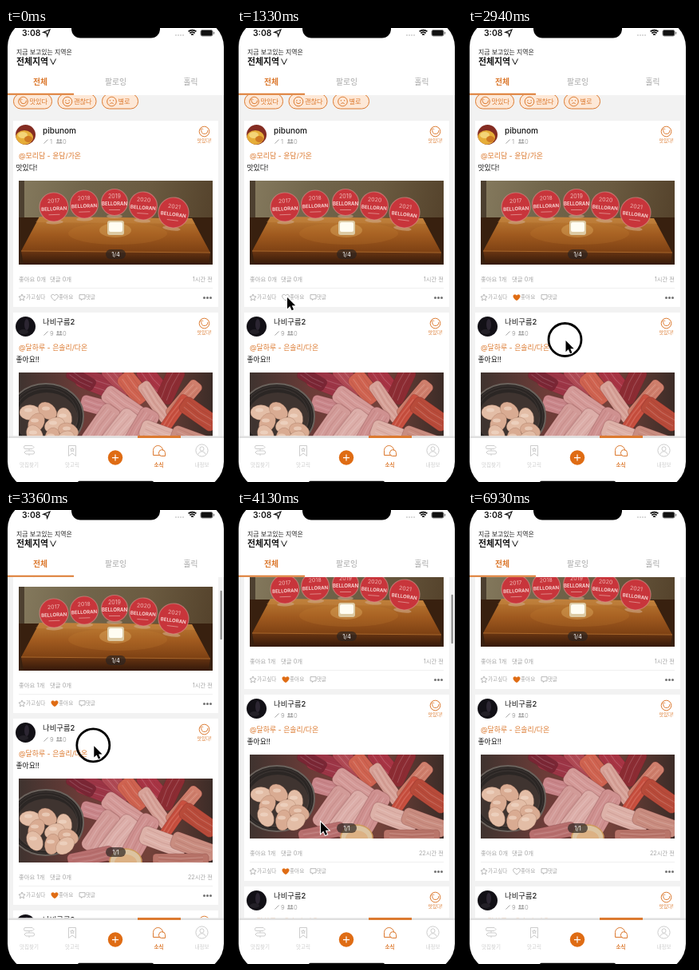
Write an HTML page with a canvas that moves like this. It is 282x568 px and loops after 7.21 s.

```html
<!DOCTYPE html>
<html lang="ko">
<head>
<meta charset="utf-8">
<title>Feed</title>
<style>
html, body { margin: 0; width: 100%; height: 100%; overflow: hidden; background: #000; }
canvas { display: block; }
</style>
</head>
<body>
<canvas width="282" height="568"></canvas>
<script>
const c = document.querySelector('canvas').getContext('2d');
const LOOP = 7210, STEP = 70;
const ORANGE = '#df6c14', TINT = '#dc7a30', GRAY = '#a6a6a6', PALE = '#cdcdcd', INK = '#161616';
const FONT = "Inter, 'Noto Sans CJK KR', 'Noto Sans CJK', sans-serif";

const HEART = new Path2D('M0 4C-6 0-4.8-3.6-2.2-3.6-.8-3.6 0-2.3 0-2.3S.8-3.6 2.2-3.6C4.8-3.6 6 0 0 4Z');
const STAR = new Path2D('M0-4L1.2-1.3 4-1 1.9 1 2.5 3.8 0 2.4-2.5 3.8-1.9 1-4-1-1.2-1.3Z');
const COMMENT = new Path2D('M-3.5-3h7v5.2h-3l-1.6 1.6v-1.6h-2.4Z');
const ARROW = new Path2D('M1 1V15.2L4.3 12.1 6.6 17.2 9 16.2 6.8 11.2H11.2Z');
const LOCATION = new Path2D('M4-4L.6 4.2-.3.3-4.2-.6Z');
const SIGN = new Path2D('M-5-5.5h9l2 2-2 2h-9q-1.5 0-1.5-2t1.5-2ZM5 1h-9l-2 2 2 2h9q1.5 0 1.5-2t-1.5-2ZM0-1.5v2.5M0 5v2');
const BOOKMARK = new Path2D('M-4.5-6.5h9v13l-4.5-3.4-4.5 3.4ZM0-3.8l.7 1.7h1.8l-1.4 1.1.5 1.8-1.6-1-1.6 1 .5-1.8-1.4-1.1h1.8Z');
const CHAT = new Path2D('M2 5.5h-9v-6a6 6 0 0 1 12 0M8 6.5h-5a4 4 0 1 1 5-4Z');

// Time, x, y of the pointer
const POINTER = [
  [0, 142, 584], [70, 135, 566], [420, 90, 425], [770, 63, 338], [1120, 62, 336], [1960, 62, 336],
  [2520, 114, 389], [2730, 116, 390], [2940, 121.5, 390], [3360, 109.3, 294.3],
  [3500, 109, 281], [3850, 108, 292], [4130, 104, 389.5], [4200, 97, 417],
  [4550, 59, 455], [4900, 61, 449], [5460, 61, 449], [5670, 93.6, 471.5],
  [6510, 93.6, 471.5], [6930, 130, 572]
];
const SCROLL = [[2940, 0], [3360, 95], [3500, 110], [3640, 118], [3850, 123], [4130, 125]];
const PRESSES = [[1540, 1680], [2800, 3500], [5040, 5320]];

function track(keys, t) {
  const next = keys.findIndex(k => k[0] > t);
  if (next < 0) return keys[keys.length - 1].slice(1);
  if (next === 0) return keys[0].slice(1);
  const a = keys[next - 1], b = keys[next], f = (t - a[0]) / (b[0] - a[0]);
  return a.slice(1).map((v, i) => v + (b[i + 1] - v) * f);
}

function box(x, y, w, h, fill, r = 0, stroke) {
  c.beginPath();
  c.roundRect(x, y, w, h, r);
  paint(fill, stroke);
}
function oval(x, y, rx, ry, fill, stroke, width, angle = 0) {
  c.beginPath();
  c.ellipse(x, y, rx, ry, angle, 0, 7);
  paint(fill, stroke, width);
}
function poly(points, fill, stroke, width) {
  c.beginPath();
  for (let i = 0; i < points.length; i += 2) c.lineTo(points[i], points[i + 1]);
  paint(fill, stroke, width);
}
function arc(x, y, r, from, to, stroke, width) {
  c.beginPath();
  c.arc(x, y, r, from, to);
  paint(null, stroke, width);
}
function paint(fill, stroke, width = 1) {
  if (fill) { c.fillStyle = fill; c.fill(); }
  if (stroke) { c.strokeStyle = stroke; c.lineWidth = width; c.stroke(); }
}
function shade(x0, y0, x1, y1, ...colors) {
  const g = c.createLinearGradient(x0, y0, x1, y1);
  colors.forEach((color, i) => g.addColorStop(i / (colors.length - 1), color));
  return g;
}
function icon(path, x, y, stroke, fill, width = .8) {
  c.save();
  c.translate(x, y);
  if (fill) { c.fillStyle = fill; c.fill(path); }
  if (stroke) { c.strokeStyle = stroke; c.lineWidth = width; c.stroke(path); }
  c.restore();
}
// y is the optical middle of the line
function text(s, x, y, size, color, weight = 400, align = 'left') {
  c.font = `${weight} ${size}px ${FONT}`;
  c.fillStyle = color;
  c.textAlign = align;
  c.fillText(s, x, y + size * .37);
}
function face(x, y, r) {
  oval(x, y, r, r, null, TINT, 1);
}
function delighted(x, y, r) {
  face(x, y, r);
  arc(x + .3, y - r * .15, r * .62, -.1, 3.4, TINT, 1);
  arc(x - r * .45, y - r * .25, r * .3, 3.2, 5.8, TINT, .8);
}
function plain(x, y, r, sad) {
  face(x, y, r);
  for (const side of [-1, 1]) oval(x + side * r * .36, y - r * .22, .7, .7, TINT);
  if (sad) arc(x, y + r * .75, r * .45, 3.6, 5.8, TINT);
  else arc(x, y - r * .05, r * .5, .3, 2.84, TINT);
}

function plaquePhoto() {
  box(0, 0, 243, 105, shade(0, 0, 243, 40, '#857a5e', '#71654b', '#6a5a40', '#55432c'));
  box(0, 0, 7, 105, '#4d4030');
  box(0, 46, 243, 59, '#38200f');
  poly([26, 45, 217, 47, 240, 90, 3, 88], shade(0, 45, 0, 90, '#bb7c35', '#a05a1f', '#7c4013'));
  oval(124, 66, 62, 14, '#c9823433');
  poly([26, 45, 217, 47, 221, 54, 21, 52], '#c98b4866');
  poly([3, 88, 240, 90, 238, 105, 6, 105], shade(0, 88, 0, 105, '#6b3612', '#34190a'));
  poly([3, 88, 240, 90], null, '#a8662a', 1.2);

  const plaques = [[44, 33, 18, -.05], [82, 29.5, 17.5, -.04], [120, 27, 16.5, 0], [156, 31.5, 17.5, .07], [194, 40, 19, .13]];
  plaques.forEach(([x, y, r, angle], i) => {
    c.save();
    c.translate(x, y);
    c.rotate(angle);
    oval(0, r + 1, r * .6, 2.5, '#cfa98899');
    oval(0, 0, r, r, '#c8353b', '#d8908a99', 1.2);
    text(2017 + i, 0, -8, 7, '#f0b8b4', 400, 'center');
    text('BELLORAN', 0, 2, 6.1, '#fbe3df', 600, 'center');
    box(-7, 9, 14, 1, '#de8584');
    c.restore();
  });
  oval(121, 62, 20, 9, '#e9bd7055');
  box(111, 50, 21, 18, '#dccaa4', 3);
  box(113, 52, 17, 12, '#fffdf2', 2);
}

function slice(x, y, length, width, degrees, color) {
  c.save();
  c.translate(x, y);
  c.rotate(degrees * Math.PI / 180);
  box(-length / 2, -width / 2, length, width, color, width * .3, '#5a1f2238');
  for (let i = -2; i < 3; i++) {
    const fibre = i * width / 6;
    poly([-length * .4, fibre, 0, fibre + 1.5, length * .4, fibre], null, i % 2 ? '#ffffff2a' : '#6e24241e', 1);
  }
  c.restore();
}
function sashimiPhoto() {
  box(0, 0, 243, 105, shade(0, 0, 243, 0, '#3f332f', '#6d3c38', '#74423a', '#3c2c27'));
  [
    [97, 13, 52, 25, 22, '#9c3546'], [78, 8, 38, 16, 30, '#7a2635'],
    [124, 9, 44, 20, 45, '#b04a55'], [144, 19, 44, 24, 50, '#cf6350'],
    [167, 10, 42, 22, 50, '#a83444'], [190, 16, 48, 22, 115, '#8c2c33'],
    [98, 42, 42, 20, 15, '#c9868a'], [131, 40, 58, 23, 35, '#d49a98'],
    [171, 37, 58, 17, 55, '#d7a298'], [207, 34, 56, 18, 130, '#cf7f6c'],
    [193, 55, 62, 14, 125, '#c9503f'], [226, 52, 52, 22, 35, '#b84b3a'],
    [103, 67, 58, 26, 125, '#d29b98'], [125, 74, 62, 26, 128, '#dcaea9'],
    [153, 72, 58, 26, 120, '#cf9190'], [181, 79, 60, 24, 20, '#ddb1a8'],
    [219, 85, 58, 22, 20, '#c98d80'], [90, 98, 58, 18, -12, '#b8706f'],
    [203, 101, 70, 14, 0, '#b9756a']
  ].forEach(s => slice(...s));
  oval(34, 55, 47, 41, '#2b2624', '#6a625c', 2);
  oval(35, 58, 39, 33, '#3f3430');
  for (let r = 44; r > 36; r -= 4) oval(34, 55, r, r * .87, null, '#83797244', .8);
  const scallops = [[14, 50], [36, 48], [57, 57], [22, 63], [45, 66], [62, 73], [20, 78], [42, 82], [58, 84]];
  scallops.forEach(([x, y], i) => {
    oval(x, y, 13, 9.5, i % 2 ? '#d9ab92' : '#e3bda6', '#9c6c5666', .8, i * .7);
    oval(x - 2, y - 3, 5, 2.5, '#f3dccb99');
  });
  oval(134, 104, 20, 16, '#dcc3a0', '#cf9a5c', 1.5);
  oval(134, 105, 14, 10, '#dcb184');
}

function card(y, post, liked) {
  c.save();
  c.translate(0, y);
  box(9, 0, 257, 233, '#fff');
  c.save();
  oval(24.5, 17.5, 12.5, 12.5, post.avatar);
  c.clip();
  if (post.gold) {
    oval(23, 21, 11, 9, '#e6ad39');
    oval(21, 18, 6, 4, '#f4d477');
    oval(28, 23, 5, 4, '#cf7a24');
  } else {
    oval(26, 15, 3, 7, '#2c2632');
    oval(22, 24, 6, 3, '#232027');
  }
  c.restore();

  text(post.user, 46, 12, post.gold ? 10 : 9.4, INK, 500);
  poly([47.5, 28.5, 52.5, 23.5], null, GRAY, 1);
  text(post.posts, 55, 26, 7.4, GRAY);
  for (const x of [65, 68.5]) {
    oval(x, 24.4, 1.3, 1.4, GRAY);
    box(x - 2, 26.2, 4, 2.4, GRAY, [2, 2, 0, 0]);
  }
  text('0', 71, 26, 7.4, GRAY);
  delighted(248.5, 13.5, 6.3);
  text('맛있다!', 248.5, 25.2, 5.8, TINT, 500, 'center');
  text(post.place, 16, 44, 8.9, TINT);
  text(post.body, 12.5, 59, 8.8, INK);

  c.save();
  c.beginPath();
  c.rect(16, 75, 243, 105);
  c.clip();
  c.translate(16, 75);
  post.photo();
  c.restore();
  box(125, 161, 25, 12, '#2a2420b0', 6);
  text(post.page, 137.5, 167, 7.4, '#fff', 400, 'center');

  text(`좋아요 ${liked ? 1 : 0}개`, 16, 198, 7.4, GRAY);
  text('댓글 0개', 55, 198, 7.4, GRAY);
  text(post.age, 259, 198, 7.3, GRAY, 400, 'right');
  box(16, 209, 243, 1, '#f0f0f0');
  icon(STAR, 20, 221, GRAY);
  text('가고싶다', 25, 221, 6.6, GRAY);
  icon(HEART, 61, 221, liked ? ORANGE : GRAY, liked && ORANGE, liked ? .3 : .8);
  text('좋아요', 66, 221, 6.6, GRAY);
  icon(COMMENT, 95.5, 220.7, GRAY);
  text('댓글', 100, 221, 6.6, GRAY);
  for (const x of [248.5, 252.5, 256.5]) oval(x, 221.5, 1.5, 1.5, '#757575');
  c.restore();
}

const FIRST = {
  user: 'pibunom', avatar: '#842c22', gold: true, posts: 1, place: '@모리담 - 윤담/가온',
  body: '맛있다!', photo: plaquePhoto, page: '1/4', age: '1시간 전'
};
const SECOND = {
  user: '나비구름2', avatar: '#121016', posts: 9, place: '@달하루 - 은솔리/다온',
  body: '좋아요!!', photo: sashimiPhoto, page: '1/1', age: '22시간 전'
};

function chip(label, x, w) {
  box(x, 82.5, w, 18.5, '#fde8d7', 9, TINT);
  text(label, x + 20, 92, 8.2, TINT);
}

function feed(t, scroll) {
  c.save();
  c.beginPath();
  c.rect(2, 84, 271, 427);
  c.clip();
  box(2, 84, 271, 427, '#f2f2f2');
  c.translate(0, -scroll);
  chip('맛있다', 9.5, 48);
  delighted(21.5, 92, 5.8);
  chip('괜찮다', 65, 48);
  plain(77, 92, 5.8);
  chip('별로', 120.5, 45);
  plain(132.5, 92, 5.8, true);
  card(116, FIRST, t >= 2310);
  card(356, SECOND, t < 6160);
  card(596, SECOND, false);
  c.restore();
  if (t > 2940 && t < 5320) {
    c.globalAlpha = Math.min(1, (5320 - t) / 350);
    box(268.6, 85 + scroll / 6, 2.1, 61.5, '#858585', 1);
    c.globalAlpha = 1;
  }
}

function header() {
  box(2, -12, 271, 96, '#fff');
  text('3:08', 20, 6.5, 10.4, '#111', 600);
  icon(LOCATION, 51, 6, '#111', null, 1.2);
  for (let x = 213; x < 224; x += 3) oval(x, 9, .8, .8, '#aaa');
  for (const r of [2, 4.7, 7.4]) arc(233.5, 10, r, -2.3, -.84, '#111', 1.7);
  box(244, 2.5, 15, 7.5, '#111', 2, '#888');
  box(260, 4.7, 1.2, 3, '#888', .5);
  text('지금 보고있는 지역은', 13, 30, 7.9, '#222');
  text('전체지역', 13, 42, 10.9, INK, 600);
  poly([55.5, 38.5, 59, 45.5, 62.5, 38.5], null, INK, 1);
  text('전체', 43, 67, 9.8, TINT, 600, 'center');
  text('팔로잉', 137.5, 67, 9.8, GRAY, 400, 'center');
  text('홀릭', 231.5, 67, 9.8, GRAY, 400, 'center');
  box(2, 81.7, 83, 2, TINT);
}

function navigation() {
  box(2, 510.5, 271, 68, '#fff');
  box(2, 510.5, 271, 2.5, '#dfdfdf');
  box(165, 510, 54, 3, TINT);
  icon(SIGN, 29, 528, PALE, null, 1);
  icon(BOOKMARK, 83, 529, PALE, null, 1);
  icon(CHAT, 191.5, 529, TINT, null, 1);
  oval(245.5, 528.5, 7.6, 7.6, null, PALE, 1);
  oval(245.5, 526.5, 2.5, 2.7, null, PALE, 1);
  arc(245.5, 534.5, 4.7, 3.4, 6.02, PALE, 1);
  oval(137, 537.5, 9.2, 9.2, ORANGE);
  box(133, 537, 8, 1.2, '#fff');
  box(136.4, 533.5, 1.2, 8, '#fff');
  text('맛집찾기', 29, 547, 6.5, PALE, 400, 'center');
  text('맛고릭', 83, 547, 6.5, PALE, 400, 'center');
  text('소식', 191.5, 547, 6.5, TINT, 600, 'center');
  text('내정보', 245.5, 547, 6.5, PALE, 400, 'center');
}

function pointer(t) {
  if (t < 70 || t >= 6930) return;
  const [x, y] = track(POINTER, t);
  if (PRESSES.some(([from, to]) => t >= from && t < to)) oval(x, y, 20.5, 20.5, null, '#000', 2.8);
  icon(ARROW, x, y, '#fff', null, 2);
  icon(ARROW, x, y, null, '#000');
}

function draw(t) {
  const [scroll] = track(SCROLL, t);
  box(0, 0, 282, 568, '#000');
  c.save();
  c.beginPath();
  c.roundRect(2, -10.5, 271, 587, 34);
  c.clip();
  header();
  feed(t, scroll);
  navigation();
  box(82, -10, 111, 22.5, '#000', 12);
  box(90, 566.8, 95, 4, '#000', 2);
  c.restore();
  pointer(t);
}

function tick() {
  const t = performance.now() % LOOP;
  draw(Math.floor(t / STEP) * STEP);
  requestAnimationFrame(tick);
}
tick();
</script>
</body>
</html>
```
